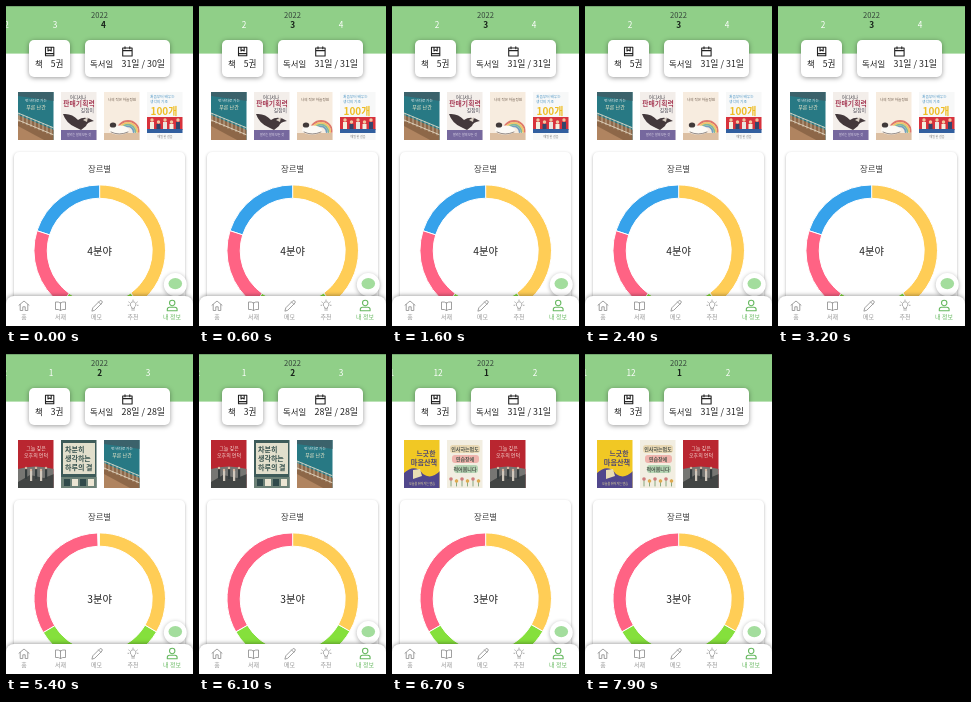
Recreate the animation shown at these times as an HTML page with a canvas. Size 187 px wide and 320 px high, loop 8 s.

```html
<!DOCTYPE html>
<html lang="ko">
<head>
<meta charset="utf-8">
<title>독서 통계</title>
<style>
  html, body { margin: 0; width: 100%; height: 100%; overflow: hidden; background: #fff; }
  canvas { display: block; width: 187px; height: 320px; }
</style>
</head>
<body>
<canvas id="stage"></canvas>
<script>
const W = 187, H = 320, LOOP = 8000;
const canvas = document.getElementById('stage');
const ctx = canvas.getContext('2d');
const ratio = window.devicePixelRatio || 1;
canvas.width = W * ratio;
canvas.height = H * ratio;

const FONT = '"Noto Sans CJK KR", "Noto Sans", sans-serif';
const GREEN = '#90cf88', INK = '#222', GRAY = '#969696';
const RING = ['#ffcd56', '#85e03c', '#ff6384', '#36a2eb'];

function text(str, x, y, size, color = INK, align = 'center', weight = 400) {
  ctx.font = `${weight} ${size}px ${FONT}`;
  ctx.fillStyle = color;
  ctx.textAlign = align;
  ctx.textBaseline = 'alphabetic';
  ctx.fillText(str, x, y);
}

function rect(x, y, w, h, color) {
  ctx.fillStyle = color;
  ctx.fillRect(x, y, w, h);
}

function roundRect(x, y, w, h, r, color) {
  ctx.beginPath();
  ctx.roundRect(x, y, w, h, r);
  ctx.fillStyle = color;
  ctx.fill();
}

function dot(x, y, rx, color, ry = rx) {
  ctx.beginPath();
  ctx.ellipse(x, y, rx, ry, 0, 0, Math.PI * 2);
  ctx.fillStyle = color;
  ctx.fill();
}

function path(d, color, width = 1, fill = false) {
  const p = new Path2D(d);
  if (fill) {
    ctx.fillStyle = color;
    ctx.fill(p);
    return;
  }
  ctx.strokeStyle = color;
  ctx.lineWidth = width;
  ctx.lineCap = ctx.lineJoin = 'round';
  ctx.stroke(p);
}

function shadowed(blur, alpha, offset, draw) {
  ctx.save();
  ctx.shadowColor = `rgba(0,0,0,${alpha})`;
  ctx.shadowBlur = blur * ratio;
  ctx.shadowOffsetY = offset * ratio;
  draw();
  ctx.restore();
}

// Book covers, each drawn in a 36 x 48 box.
const covers = {
  harbor() {
    rect(0, 0, 36, 48, '#287984');
    path('M0 0H36V9L0 4Z', '#3b626b', 1, true);
    path('M0 23L36 38V48H0Z', '#8d6748', 1, true);
    path('M0 34L26 48H0Z', '#b08460', 1, true);
    for (let x = 1; x < 36; x += 4) path(`M${x} ${21 + x * .42}v8`, '#d9d0bd', .7);
    path('M0 21L36 36M0 28L36 43', '#eee3cf', .8);
    text('먼 바다로 가는', 18, 10, 3.6, '#eee');
    text('푸른 난간', 18, 17, 5, '#f5edcc', 'center', 500);
  },
  sales() {
    rect(0, 0, 36, 48, '#f3eeea');
    text('어디서나', 9, 7, 4.4, '#454249', 'left', 500);
    text('판매기획력', 18, 14, 6.8, '#a83f59', 'center', 700);
    text('길잡이', 33, 20, 4.8, '#494754', 'right', 500);
    path('M2 22Q11 21 17 28Q24 23 33 29Q26 30 25 34L20 38L14 35Q5 31 2 22Z', '#43383b', 1, true);
    path('M22 28L27 25L26 30Z', '#d9cfc4', 1, true);
    rect(0, 38, 36, 10, '#76689e');
    text('팔리는 말의 모든 것', 18, 44, 3, '#e8e3f0');
  },
  rainbow() {
    rect(0, 0, 36, 48, '#f7ecdf');
    text('나의 작은 하늘정원', 18, 9, 3.6, '#6c5a4c');
    ['#de786b', '#f1c467', '#82b996', '#739ec1'].forEach((color, i) => {
      ctx.beginPath();
      ctx.arc(24, 40, 11 - i * 1.8, Math.PI, Math.PI * 2);
      ctx.strokeStyle = color;
      ctx.lineWidth = 1.8;
      ctx.stroke();
    });
    rect(0, 41, 36, 7, '#dcbfa2');
    dot(15, 38, 10, '#fbf9f5', 4.5);
    dot(9, 33, 3.2, '#413a3a', 2.6);
    path('M7 40Q15 44 24 40', '#6d625d', .7);
  },
  hundred() {
    rect(0, 0, 36, 48, '#f7f8f8');
    text('처음부터 배우는', 3, 6, 3.7, '#4b94c4', 'left');
    text('생각의 기초', 3, 11, 3.7, '#4b94c4', 'left');
    text('100개', 17, 23, 10, '#eebd25', 'center', 700);
    rect(0, 25, 36, 13, '#d8323c');
    for (let i = 0; i < 5; i++) {
      const x = 5 + i * 6.5, y = 28 + i % 2 * 2;
      dot(x, y, 1.7, '#efc8a2');
      rect(x - 2, y + 2, 4, 8, ['#f4efdf', '#34466b', '#e9e5df'][i % 3]);
    }
    rect(0, 37, 36, 4, '#315f9f');
    text('매일 한 걸음', 18, 46, 3, '#777');
  },
  crimson() {
    rect(0, 0, 36, 48, '#b92630');
    path('M0 29Q17 24 36 29V48H0Z', '#767673', 1, true);
    path('M0 42L12 35L26 38L36 34V48H0Z', '#424544', 1, true);
    for (let i = 0; i < 5; i++) {
      rect(7 + i * 5, 29 + i % 2 * 2, 2.2, 10, i % 2 ? '#d1c9bd' : '#353c3d');
      dot(8 + i * 5, 28 + i % 2 * 2, 1.2, '#d9b9a2');
    }
    text('그늘 깊은', 18, 10, 5, '#f5ddd7', 'center', 500);
    text('오후의 언덕', 18, 17, 5, '#f5ddd7', 'center', 500);
  },
  study() {
    rect(0, 0, 36, 48, '#3e5b59');
    rect(2, 3, 32, 31, '#e2dfcc');
    ['차분히', '생각하는', '하루의 결'].forEach((line, i) =>
      text(line, 4, 12 + i * 9, 7, '#35504d', 'left', 700));
    rect(0, 37, 36, 11, '#6c8177');
    for (let i = 0; i < 4; i++) rect(3 + i * 8, 39, 6, 7, i % 2 ? '#ece6d4' : '#304a4b');
  },
  yellow() {
    rect(0, 0, 36, 48, '#f1c824');
    text('느긋한', 22, 16, 6.8, '#4d4574', 'center', 700);
    text('마음산책', 20, 25, 7.2, '#514873', 'center', 700);
    path('M0 33Q11 23 19 34Q27 40 36 31V48H0Z', '#51478c', 1, true);
    path('M9 30L16 29L18 36L9 39Z', '#e9ddb4', 1, true);
    text('오늘을 쉬어가는 연습', 18, 45, 3, '#f4ec9b');
  },
  guide() {
    rect(0, 0, 36, 48, '#f2eee1');
    ['인사하는법도', '연습장에', '적어봅니다'].forEach((line, i) => {
      roundRect(3 + i * 2, 5 + i * 10, 30 - i * 3, 8, 3, ['#e9d9b4', '#efb4ad', '#b5d4b3'][i]);
      text(line, 18, 11 + i * 10, 5, '#4f554c', 'center', 700);
    });
    for (let i = 0; i < 6; i++) {
      path(`M${4 + i * 5.5} 46v-6`, '#6f9668', .8);
      dot(4 + i * 5.5, 39 + i % 2 * 2, 1.8, i % 2 ? '#dfaa50' : '#cf7c7b');
    }
  }
};

const shelves = [
  { from: 0, read: 31, books: 5, shares: [2, 1, 1, 1], covers: ['harbor', 'sales', 'rainbow', 'hundred'] },
  { from: 4800, read: 28, books: 3, shares: [1, 1, 1], covers: ['crimson', 'study', 'harbor'] },
  { from: 6600, read: 31, books: 3, shares: [1, 1, 1], covers: ['yellow', 'guide', 'crimson'] }
];

// Each swipe is a quick flick; its data arrives about half a second later.
const SWIPE = 200;
const swipes = [
  { start: -34, from: 4, to: 3 },
  { start: 4300, from: 3, to: 2 },
  { start: 6100, from: 2, to: .98 }
];

const clamp = p => Math.min(1, Math.max(0, p));
const easeInOut = p => p * p * (3 - 2 * p);
const easeOutQuart = p => 1 - (1 - p) ** 4;

function monthAt(t) {
  const s = swipes.findLast(swipe => swipe.start <= t);
  return s.from + (s.to - s.from) * easeInOut(clamp((t - s.start) / SWIPE));
}

function drawHeader(month) {
  rect(0, 0, W, 47.6, GREEN);
  rect(0, 0, W, .6, '#658f61');
  text('2022', 93.5, 11.5, 7.6, '#34443a');
  const selected = Math.round(month);
  for (let m = selected - 2; m <= Math.min(4, selected + 2); m++) {
    const active = m === selected;
    text((m + 11) % 12 + 1, 93.6 + (m - month) * 48.5, 22, 8.3,
      active ? '#172219' : '#fff', 'center', active ? 700 : 400);
  }
}

function drawSummary(shelf, days) {
  for (const [x, w] of [[23, 41], [79, 85]]) {
    shadowed(5, .4, 1, () => roundRect(x, 34, w, 37, 5, '#fff'));
  }
  path('M39.5 41.2h8.3v8.6h-8.3zM39.5 47.6h8.3M42 41.2v3.8l1.6-1 1.6 1v-3.8', INK, 1.1);
  path('M116.7 42h9.4v8h-9.4zM116.7 44.6h9.4M119 40.7v2M123.8 40.7v2', INK, 1.1);
  text('책', 29, 61, 8.4, INK, 'left', 500);
  text(`${shelf.books}권`, 57.5, 61, 8.6, INK, 'right', 500);
  text('독서일', 84, 61, 8.4, INK, 'left', 500);
  text(`${shelf.read}일 / ${days}일`, 159, 61, 8.9, INK, 'right', 500);
}

function drawBooks(names) {
  names.forEach((name, i) => {
    ctx.save();
    ctx.translate(12 + i * 43, 86);
    ctx.beginPath();
    ctx.rect(0, 0, 35.5, 48);
    ctx.clip();
    covers[name]();
    ctx.restore();
  });
}

function anglesOf(shares) {
  const total = shares.reduce((a, b) => a + b);
  let sum = 0;
  return shares.map(n => [sum / total, (sum += n) / total]);
}

function drawChart(shelf, previous, t) {
  shadowed(3, .3, 1, () => roundRect(8, 146, 171, 190, 5, '#fff'));
  text('장르별', 93.5, 166, 8.4, '#444');
  const before = anglesOf(previous.shares);
  const p = easeOutQuart(clamp((t - shelf.from) / 1000));
  const turn = f => f * Math.PI * 2 - Math.PI / 2;
  anglesOf(shelf.shares).forEach((range, i) => {
    const [a, b] = range.map((end, k) => turn(before[i][k] + (end - before[i][k]) * p));
    ctx.beginPath();
    ctx.arc(93.7, 244.7, 65.8, a, b);
    ctx.arc(93.7, 244.7, 52.5, b, a, true);
    ctx.closePath();
    ctx.fillStyle = RING[i];
    ctx.fill();
    ctx.strokeStyle = '#fff';
    ctx.lineWidth = 1;
    ctx.stroke();
  });
  text(`${shelf.shares.length}분야`, 93.7, 248.5, 10.3);
}

function drawNav() {
  shadowed(4, .3, 1, () => dot(169.3, 278.6, 11.5, '#fff'));
  dot(169.3, 277.6, 6.8, '#a3dd9d', 5.6);
  shadowed(4, .4, -.5, () => roundRect(0, 290, W, 40, [8, 8, 0, 0], '#fff'));
  const active = '#66b85f';
  path('M13 299.2L18 295l5 4.2M14.2 298.5v6h2.6v-3.7h2.4v3.7h2.6v-6', GRAY, .9);
  path('M54.5 297q-2-1.5-5-1v7.5q3-.5 5 1 2-1.5 5-1V296q-3-.5-5 1zv7.5', GRAY, .9);
  path('M86 304.8l.8-3 7-7q1.2-.6 2 .2t.2 2l-7 7zM92.6 296l2.2 2.2', GRAY, .9);
  path('M125.7 302v-1a2.8 2.8 0 1 1 2.8 0v1zM125.8 304h2.6M127 294v.6M122.8 296l.6.4M131.3 296l-.6.4M122 299.3h.7M131.4 299.3h.7', GRAY, .8);
  path('M168.9 297a2.7 2.7 0 1 1-5.4 0 2.7 2.7 0 0 1 5.4 0M161.3 304.7v-1.3q0-2.2 2.2-2.2h5.4q2.2 0 2.2 2.2v1.3z', active, 1.1);
  [['홈', 18], ['서재', 54.5], ['메모', 90.5], ['추천', 127]].forEach(([label, x]) =>
    text(label, x, 312.5, 6, GRAY));
  text('내 정보', 166, 312.5, 6, active, 'center', 500);
}

function render(t) {
  const index = shelves.findLastIndex(s => s.from <= t);
  const shelf = shelves[index], month = monthAt(t);
  const days = [31, 28, 31, 30][Math.round(month) - 1];
  ctx.setTransform(ratio, 0, 0, ratio, 0, 0);
  rect(0, 0, W, H, '#fff');
  drawHeader(month);
  drawSummary(shelf, days);
  drawBooks(shelf.covers);
  drawChart(shelf, shelves[Math.max(0, index - 1)], t);
  drawNav();
}

const start = performance.now();
function tick() {
  render((performance.now() - start) % LOOP);
  requestAnimationFrame(tick);
}
tick();
</script>
</body>
</html>
```
